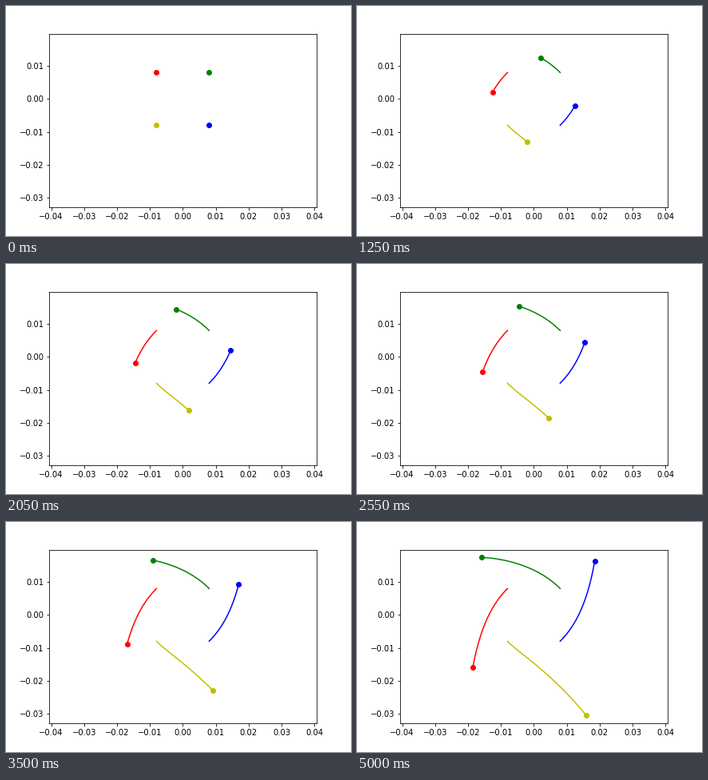
These frames come from a looping animation (432x288 px, 5050 ms). A matplotlib script:

```python
import numpy as np
import matplotlib.pyplot as plt
from matplotlib.animation import FuncAnimation

STEPS = 101
SUB = 20          # integration substeps per frame
PULL = 4.378e-10  # inverse-square pull toward the centre
SPEED = 2.147e-4  # starting speed along each axis, per frame


def orbit():
    """Leapfrog path of one body flung sideways around the centre."""
    dt = 1 / SUB
    pos = np.array([-0.008, 0.008])
    vel = np.array([-SPEED, -SPEED])
    path = [pos.copy()]

    def acc(p):
        return -PULL * p / np.hypot(*p) ** 3

    for _ in range(STEPS - 1):
        for _ in range(SUB):
            vel = vel + acc(pos) * dt / 2
            pos = pos + vel * dt
            vel = vel + acc(pos) * dt / 2
        path.append(pos.copy())
    return np.array(path).T


x, y = orbit()
u = np.linspace(0, 1, STEPS)
drift = u ** 3
# The yellow body breaks away downward and disturbs the other three.
drop = (0.01274 - 0.00068 * u) * u ** 2 * (1 - np.exp(-(u / 0.27) ** 1.5))

paths = {
    "r": (x, y + 0.00007 * drift),
    "g": (y, -x - 0.00105 * drift),
    "b": (-x, -y + 0.0005 * drift),
    "y": (-y, x - drop),
}

plt.rcParams.update({"font.family": "DejaVu Sans", "font.size": 10})
fig = plt.figure(figsize=(6, 4), dpi=72, facecolor="white")
ax = fig.add_axes([0.125, 0.125, 0.775, 0.755])
ax.set_xlim(-0.04061, 0.04061)
ax.set_ylim(-0.03292, 0.01983)
ax.set_xticks(np.arange(-4, 5) / 100)
ax.set_yticks(np.arange(-3, 2) / 100)

trails = {c: ax.plot([], [], color=c, lw=1.5)[0] for c in paths}
dots = {c: ax.plot([], [], "o", color=c, ms=6)[0] for c in paths}


def draw(i):
    for c, (px, py) in paths.items():
        trails[c].set_data(px[:i + 1], py[:i + 1])
        dots[c].set_data([px[i]], [py[i]])
    return [*trails.values(), *dots.values()]


anim = FuncAnimation(fig, draw, frames=STEPS, interval=50,
                     init_func=lambda: draw(0), repeat=True, repeat_delay=0)
plt.show()
```
